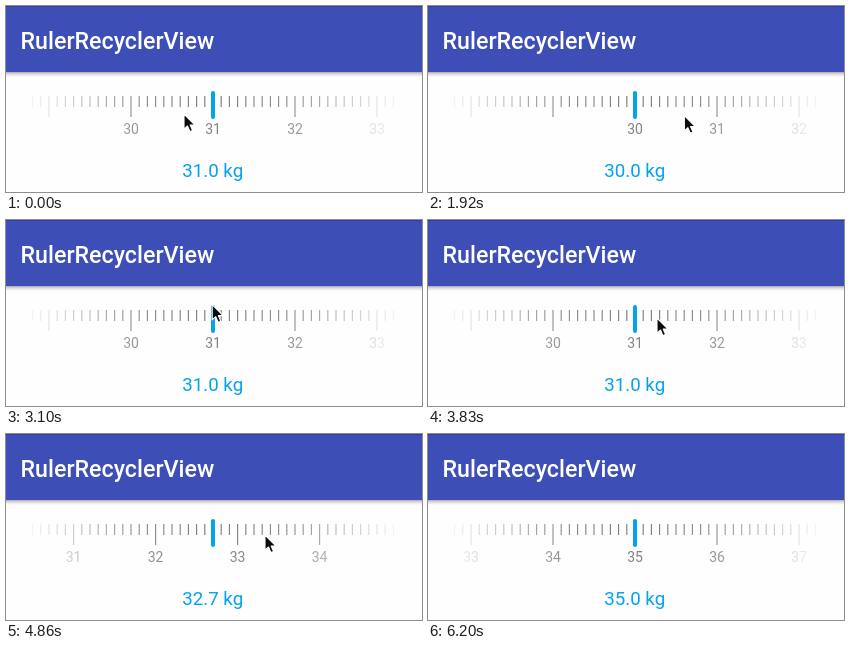
An HTML page for the animation above (6.76 s loop, 416 by 186 pixels).

```html
<!DOCTYPE html>
<html lang="en">
<head>
<meta charset="utf-8">
<title>RulerRecyclerView</title>
<style>
  html, body { margin: 0; width: 100%; height: 100%; overflow: hidden; background: #fefefe; }
  svg { display: block; width: 416px; height: 186px; font-family: Roboto, sans-serif; }
</style>
</head>
<body>
<svg viewBox="0 0 416 186">
  <defs>
    <linearGradient id="shadow" x2="0" y2="1">
      <stop stop-color="#a9a9ad"/>
      <stop offset=".4" stop-color="#dcdcde"/>
      <stop offset="1" stop-color="#fefefe"/>
    </linearGradient>
    <linearGradient id="fade" gradientUnits="userSpaceOnUse" x1="207" x2="389" spreadMethod="reflect">
      <stop stop-color="#fefefe" stop-opacity="0"/>
      <stop offset=".45" stop-color="#fefefe" stop-opacity=".18"/>
      <stop offset=".77" stop-color="#fefefe" stop-opacity=".62"/>
      <stop offset="1" stop-color="#fefefe" stop-opacity=".92"/>
    </linearGradient>
    <clipPath id="window"><rect x="25" y="80" width="364" height="55"/></clipPath>
  </defs>
  <rect width="416" height="186" fill="#fefefe"/>
  <rect y="66" width="416" height="5" fill="url(#shadow)"/>
  <rect width="416" height="66" fill="#3d4eb6"/>
  <rect width="416" height="1" fill="#3040a0"/>
  <text x="14.6" y="42.8" font-size="23.23" font-weight="500" fill="#fff">RulerRecyclerView</text>
  <g clip-path="url(#window)">
    <path id="ticks" fill="none" stroke="#7c7c7c" stroke-width="1.15"/>
    <g id="labels" font-size="14" fill="#828282" text-anchor="middle"></g>
    <rect x="25" y="80" width="364" height="55" fill="url(#fade)"/>
  </g>
  <rect x="205" y="85" width="4" height="28" rx="2" fill="#04a3ee"/>
  <text id="value" x="206.7" y="171" font-size="18.7" fill="#04a3ee" text-anchor="middle"></text>
  <circle id="touch" r="13" fill="#fff" fill-opacity=".8" stroke="#cccfec" stroke-width="2"/>
  <path id="cursor" d="M0 0V15.2L3.5 12 6 17.6 8.6 16.5 6.2 11H11Z" fill="#0c0c0c" stroke="#fff" stroke-width="1.1" stroke-linejoin="round"/>
</svg>
<script>
const LOOP = 6760, FIRST = 585, STEP = 147.4, LAST = 38;
const CENTER = 207, UNIT = 82, MIN = 30, REACH = 2.22;
const TOUCH_LAG = 0.55;
const el = id => document.getElementById(id);

// All motion is measured in screen updates, one every STEP ms.
const STOPS = [ // update, x, y
  [-0.2, 178, 108], [3, 326, 112], [11.5, 238, 109], [14, 190, 108],
  [19, 215, 72], [22, 229, 98], [25, 272, 102], [27, 196, 104],
  [29, 259, 101], [31.5, 214, 105], [34, 230, 107], [LAST, 270, 186]
];
const DRAGS = [[1, 3], [12, 14], [24, 26], [30, 31]];

function ramp(from, to, k) {
  const p = Math.min(1, Math.max(0, (k - from) / (to - from)));
  return p * p * (3 - 2 * p);
}

function valueAt(k) {
  return 31 - ramp(0, 3, k) + ramp(12.9, 15.3, k)
    + 1.7 * ramp(23.5, 29, k) + 2.3 * ramp(30, 36.7, k);
}

function cursorAt(k) {
  let [, x, y] = STOPS[0];
  for (let i = 1; i < STOPS.length; i++) {
    const [from, x0, y0] = STOPS[i - 1], [to, x1, y1] = STOPS[i];
    const p = ramp(from, to, k);
    x += (x1 - x0) * p;
    y += (y1 - y0) * p;
  }
  return [x, y];
}

function drawRuler(value) {
  let path = '', labels = '';
  const last = Math.floor((value + REACH + 0.2) * 10);
  for (let i = Math.ceil((value - REACH - 0.2) * 10); i <= last; i++) {
    const offset = i / 10 - value;
    const x = (CENTER + offset * UNIT).toFixed(2);
    const major = i % 10 === 0;
    if (Math.abs(offset) < REACH) path += `M${x} 90V${major ? 111 : 101}`;
    if (major && i / 10 >= MIN) labels += `<text x="${x}" y="128">${i / 10}</text>`;
  }
  el('ticks').setAttribute('d', path);
  el('labels').innerHTML = labels;
  el('value').textContent = value.toFixed(1) + ' kg';
}

function place(node, x, y, visible) {
  node.setAttribute('transform', `translate(${x} ${y})`);
  node.setAttribute('visibility', visible ? 'visible' : 'hidden');
}

function render(time) {
  const k = Math.min(LAST, Math.floor((time - FIRST) / STEP));
  const [x, y] = cursorAt(k), [touchX, touchY] = cursorAt(k - TOUCH_LAG);
  drawRuler(valueAt(k));
  place(el('touch'), touchX, touchY + 2.5, DRAGS.some(([from, to]) => k >= from && k <= to));
  place(el('cursor'), x, y, k < LAST);
}

const start = performance.now();
function frame() {
  render((performance.now() - start) % LOOP);
  requestAnimationFrame(frame);
}
frame();
</script>
</body>
</html>
```
